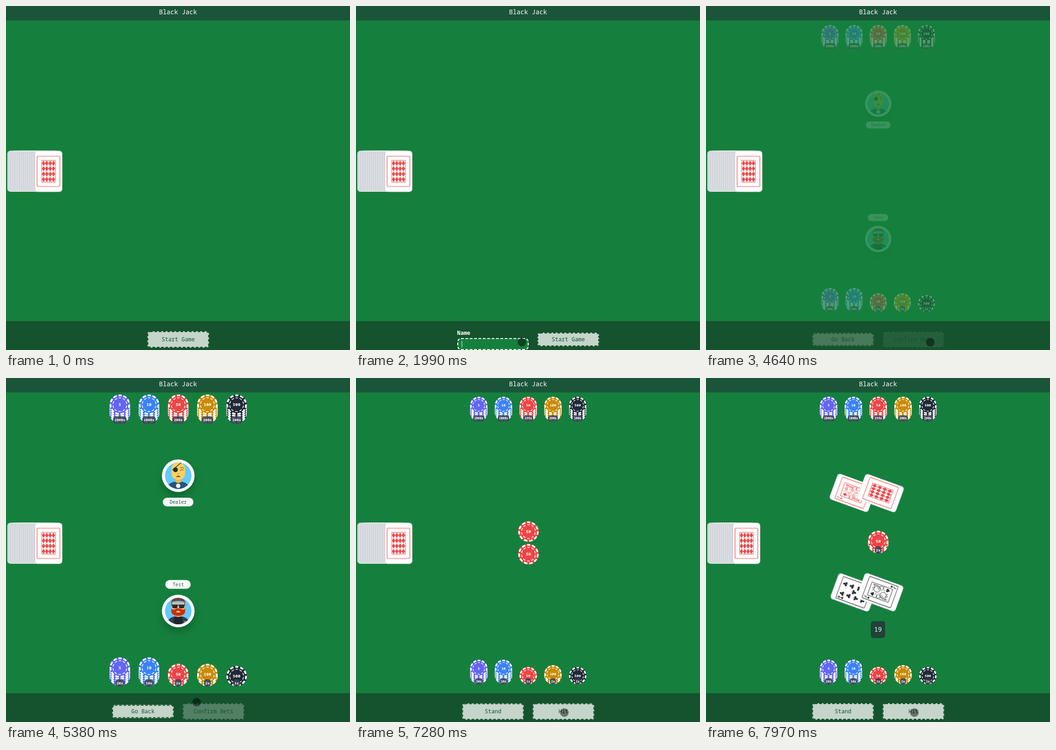
Recreate the animation shown at these times as an HTML page. Size 747 by 750 pixels, loop 8 s.

```html
<!DOCTYPE html>
<html lang="en">
<head>
<meta charset="utf-8">
<title>Black Jack</title>
<style>
  html, body { margin: 0; width: 100%; height: 100%; overflow: hidden; background: #15803d; }
  svg { display: block; width: 747px; height: 750px; }
  text { font-family: "Noto Sans Mono", "DejaVu Sans Mono", monospace; white-space: pre; }
  .suit { font-family: "DejaVu Sans", sans-serif; }
  .avatar { filter: drop-shadow(0 10px 9px rgba(0, 0, 0, .22)); }
</style>
</head>
<body>
<svg id="stage" viewBox="0 0 747 750">
  <defs>
    <clipPath id="round"><circle r="29"/></clipPath>
  </defs>
  <rect width="747" height="750" fill="#15803d"/>
  <rect width="747" height="31.5" fill="#1b5539"/>
  <rect y="687" width="747" height="63" fill="#14532d"/>

  <g id="chips"></g>
  <g id="dealerCards"></g>
  <g id="deck"></g>
  <g id="bets"></g>

  <g id="dealer">
    <g class="avatar"><circle r="35.5" fill="#fff"/></g>
    <g clip-path="url(#round)">
      <circle r="29" fill="#65c9ff"/>
      <path d="M-6 4h12v14h-12z" fill="#e9bb4a"/>
      <path d="M-24 32c0-14 7-17 17-19q7 6 14 0c10 2 17 5 17 19z" fill="#25557c"/>
      <path d="M-15-14c0-20 30-20 30 0v8c0 20-30 20-30 0z" fill="#f8d25c"/>
      <path d="M-13-12 7-29" stroke="#262e33" stroke-width="1.4"/>
      <circle cx="-6" cy="-13" r="5.2" fill="#262e33"/>
      <path d="M4-17q4-2 8 1M4-11q3-3 7-1" fill="none" stroke="#6b5526" stroke-width="1.3"/>
      <path d="M-2-5q2 2 4 0" fill="none" stroke="#c79a37" stroke-width="1.4"/>
      <path d="M-5 3q5-6 10 0z" fill="#6d1f2a"/>
      <path d="M-3.5 2.6q3.5-2 7 0z" fill="#ff4f6d"/>
      <circle cy="22" r="4.8" fill="#f3f6f8"/>
    </g>
    <rect x="-33.5" y="48" width="66.5" height="19" rx="9.5" fill="#f5f6f7"/>
  </g>

  <g id="player">
    <g class="avatar"><circle r="35.5" fill="#fff"/></g>
    <g clip-path="url(#round)">
      <circle r="29" fill="#65c9ff"/>
      <path d="M-24 32c0-14 6-17 15-20h18c9 3 15 6 15 20z" fill="#2f3c4a"/>
      <path d="M-8 12h16l2 20h-20z" fill="#1d252d"/>
      <path d="M-14-18h28v16c0 20-28 20-28 0z" fill="#e9b58d"/>
      <path d="M-15-8v-11c0-13 30-13 30 0v11l-2-12q-13-4-26 0z" fill="#724133"/>
      <path d="M-15-6c2 4 6 3 8 2q7-4 14 0c2 1 6 2 8-2v7c0 13-30 13-30 0z" fill="#c93305"/>
      <path d="M-5 2q5-5 10 0l-2 1h-6z" fill="#f0d8c4"/>
      <path d="M-15-13h30" stroke="#20262b" stroke-width="1.6"/>
      <rect x="-13" y="-14" width="11.5" height="8" rx="3.5" fill="#20262b"/>
      <rect x="1.500" y="-14" width="11.5" height="8" rx="3.5" fill="#20262b"/>
      <path d="M-11-9l5-4M4-9l5-4" stroke="#59656d"/>
      <path d="M12 24l5-2" stroke="#dfe5e8" stroke-width="1.3"/>
    </g>
    <rect x="-28" y="-67.5" width="55" height="19" rx="9.5" fill="#fff"/>
  </g>

  <g id="playerCards"></g>
  <g id="score"><rect x="358" y="530" width="31" height="37" rx="6" fill="#1f4239"/></g>
  <g id="form">
    <rect x="221" y="725" width="153" height="24" rx="7" fill="#15803d" stroke="#fff"
          stroke-width="2" stroke-dasharray="6 3.5"/>
    <rect id="caret" x="229.500" y="730" width="1" height="14" fill="#fff"/>
  </g>
  <g id="buttons"></g>
  <circle id="cursor" r="9.3" fill="#000" fill-opacity=".47"/>
</svg>

<script>
const LOOP = 8000;
const RED = '#ef4444', INK = '#26292c', LEAF = '#14532d';
const $ = id => document.getElementById(id);

function add(parent, tag, attrs = {}, text) {
  const node = document.createElementNS('http://www.w3.org/2000/svg', tag);
  for (const key in attrs) node.setAttribute(key, attrs[key]);
  if (text !== undefined) node.textContent = text;
  return parent.appendChild(node);
}

// Text placed by the middle of its capitals
function label(parent, x, y, size, fill, text, extra = {}) {
  return add(parent, 'text', {
    x, y: y + size * .35, 'font-size': size, fill, 'text-anchor': 'middle', ...extra
  }, text);
}

// frames: [ms, properties, easing]; the first and last are held to the loop's ends
function play(node, frames) {
  const all = frames.filter(f => f[0] <= LOOP);
  if (all[0][0] > 0) all.unshift([0, all[0][1]]);
  const last = all[all.length - 1];
  if (last[0] < LOOP) all.push([LOOP, last[1]]);
  node.animate(all.map(([ms, props, easing = 'ease-in-out']) =>
    ({ offset: ms / LOOP, easing, ...props })), { duration: LOOP, iterations: Infinity });
}

const pose = (x, y, s = 1, r = 0) =>
  ({ transform: `translate(${x}px, ${y}px) rotate(${r}deg) scale(${s})` });
const move = (node, steps) =>
  play(node, steps.map(([ms, x, y, s, r, easing]) => [ms, pose(x, y, s, r), easing]));
const fade = (node, steps) =>
  play(node, steps.map(([ms, opacity]) => [ms, { opacity }, 'linear']));
const show = (node, from, to = LOOP + 1, len = 0) =>
  fade(node, [[from, 0], [from + len, 1], [to, 1], [to + len, 0]]);
const hide = (node, at, len = 0) => fade(node, [[at, 1], [at + len, 0]]);

// Chips
const KINDS = [['5', '#6366f1'], ['10', '#3b82f6'], ['50', RED], ['100', '#ca8a04'], ['500', '#1f2937']];
const STEP = 4.65;

function ring(g, r, width, dash, count) {
  const gap = 2 * Math.PI * r / count - dash;
  add(g, 'circle', {
    r, fill: 'none', stroke: '#fff', 'stroke-width': width,
    'stroke-dasharray': `${dash} ${gap}`, 'stroke-dashoffset': dash / 2, transform: 'rotate(-90)'
  });
}

function chip(parent, x, y, [value, color]) {
  const g = add(parent, 'g', { transform: `translate(${x} ${y})` });
  add(g, 'circle', { r: 22.3, fill: color });
  ring(g, 20.4, 3.75, 7.5, 11);
  ring(g, 15, 1.6, 5.6, 10);
  label(g, 0, 0, 9.2, '#fff', value, { 'font-weight': 700 });
  return g;
}

function badge(parent, x, y, text) {
  const g = add(parent, 'g');
  const w = text.length * 4.7 + 6;
  add(g, 'rect', { x: x - w / 2, y: y - 8, width: w, height: 16, rx: 6.5, fill: '#374151', 'fill-opacity': .88 });
  label(g, x, y, 7.8, '#fff', text, { 'font-weight': 700 });
  return g;
}

function row(middle, base, counts) {
  const g = add($('chips'), 'g');
  const stacks = KINDS.map((kind, i) => {
    const x = (i - 2) * 63.4, y = base - middle;
    const n = Math.min(counts[i], 5);
    const layers = [];
    for (let k = 0; k < n; k++) layers.push(chip(g, x, y - k * STEP, kind));
    return { x, y: y + 14.8, top: layers[n - 1], tag: badge(g, x, y + 14.8, counts[i] + 'x') };
  });
  move(g, [[4560, 374, middle, .8], [4880, 374, middle, 1], [6880, 374, middle, 1], [7300, 374, middle, .846], [7970, 374, middle, .85]]);
  show(g, 4560, LOOP + 1, 280);
  return { g, fifty: stacks[2] };
}

const BET = 6050;
const house = row(68, 76.8, [2000, 1000, 200, 200, 100]);
const mine = row(642, 650, [20, 10, 2, 2, 1]);
hide(mine.fifty.top, BET);
for (const [{ g, fifty }, text] of [[house, '199x'], [mine, '1x']]) {
  hide(fifty.tag, BET);
  show(badge(g, fifty.x, fifty.y, text), BET);
}

// Bets
function bet(from, mid, rest, late, end) {
  const g = add($('bets'), 'g');
  chip(g, 0, 0, KINDS[2]);
  move(g, [[BET, 374, from, .75], [6330, 374, mid, .87, 0, 'ease-out'], [6620, 374, rest],
    [6880, 374, rest], [7300, 374.5, late], [7640, 374.5, late], [7900, 374, end]]);
  show(g, BET, LOOP + 1, 120);
}
bet(505, 475, 419, 384, 360);
bet(213, 243, 300, 335, 355.3);
show(badge($('bets'), 374, 375, '2x'), 7820, LOOP + 1, 100);

// Cards, drawn around their middle: a plate, then a panel with the picture
const plate = g => add(g, 'rect', {
  x: -29.5, y: -44.5, width: 59, height: 89, rx: 6, fill: '#fff', stroke: '#c9ced3', 'stroke-width': .7
});

function panel(parent, color) {
  const g = add(parent, 'g');
  add(g, 'rect', { x: -27, y: -34.5, width: 54, height: 69, rx: 2, fill: '#fff' });
  add(g, 'rect', { x: -25, y: -33, width: 49.5, height: 66, rx: 1.5, fill: 'none', stroke: color, 'stroke-width': 1.2 });
  return g;
}

function back(parent) {
  const g = panel(parent, RED);
  add(g, 'rect', { x: -15, y: -24, width: 29.5, height: 47.5, fill: 'none', stroke: RED });
  let d = '';
  for (let i = 0; i < 16; i++)
    d += `M${-10.9 + i % 4 * 7.1} ${-23.4 + (i >> 2) * 11.7}l3.6 5.800l-3.6 5.800l-3.6-5.800z`;
  add(g, 'path', { d, fill: RED });
  return g;
}

function face(parent, rank, suit, color) {
  const g = panel(parent, color);
  for (const turn of [0, 180]) {
    const half = add(g, 'g', { transform: `rotate(${turn})` });
    const pip = (x, y, size) => label(half, x, y, size, color, suit, { class: 'suit' });
    label(half, -20, -27, 9, color, rank, { 'font-weight': 700 });
    pip(-20, -19.5, 8);
    if (rank === 'J') {
      pip(-9, -15, 13);
      add(half, 'path', {
        d: 'M-2-18l3 3 3-4 3 4 4-3v5M-5-9q-4 5-9 6M10-8l4 9M-3-2l-8 6M-14-5l8 2M12-20v12M6-8h3M4-5h4',
        fill: 'none', stroke: color, 'stroke-width': .9
      });
      add(half, 'circle', { cx: 4, cy: -8.500, r: 6.5, fill: 'none', stroke: color });
    } else {
      for (const x of [-11, 11]) for (const y of [-22.5, -8]) pip(x, y, 14);
      if (!turn) pip(0, 0, 14);
    }
  }
  if (rank === 'J') add(g, 'rect', { x: -15, y: -24, width: 30, height: 48, fill: 'none', stroke: color });
  return g;
}

const DEAL = 7480;
function deal(parent, draw, midX, midY, x, y, seen) {
  const g = add(parent, 'g');
  const base = plate(g);
  const body = add(g, 'g');
  const sides = draw(body);
  move(g, [[DEAL, 92.5, 360.5, 1, 0, 'ease-in'], [7620, midX, midY, 1.25, 14.5, 'cubic-bezier(.3,.35,.5,1)'], [7960, x, y, 1, 110]]);
  fade(base, [[DEAL, 0], [7620, .45], [7740, 1]]);
  fade(body, [[DEAL, 0], [7620, seen], [7720, 1]]);
  return sides;
}

const hidden = deal($('dealerCards'), b => [back(b), face(b, 'J', '♦', RED)], 113, 323, 319, 250.5, 1);
fade(hidden[1], [[7720, 0], [7960, .85]]);
deal($('dealerCards'), back, 128, 323, 379, 251, 1);
deal($('playerCards'), b => face(b, '9', '♣', INK), 137, 378, 321, 467.5, .6);
deal($('playerCards'), b => face(b, 'J', '♠', INK), 119, 376, 378, 467, .62);

// Deck
for (let i = 0; i < 13; i++)
  add($('deck'), 'rect', { x: 3.3 + i * 4.62, y: 316, width: 59, height: 88.5, rx: 6, fill: '#d1d5db', stroke: '#eef0f2', 'stroke-width': .8 });
hide($('deck').children[12], 7760);
const topCard = add($('deck'), 'g');
plate(topCard);
back(topCard);
move(topCard, [[7500, 92.5, 360.5], [7900, 88, 360.5]]);

// Players
label($('dealer'), 0, 57.5, 10.3, '#1f5a55', 'Dealer');
label($('player'), 0, -58, 10.3, '#166534', 'Test');
for (const [id, y, shift] of [['dealer', 213, -42], ['player', 508, 42]]) {
  move($(id), [[4600, 374, y, .8], [4900, 374, y, 1], [6020, 374, y, 1], [6300, 374, y + shift, 1],
    [6850, 374, y + shift, 1], [7100, 374, y + shift, .8]]);
  show($(id), 4600, 6850, 260);
}
label($('score'), 373.5, 548.5, 13.75, '#fff', '19', { 'font-weight': 500 });
show($('score'), 7380, LOOP + 1, 160);

label($('stage'), 373.5, 13.5, 13.75, '#fff', 'Black Jack', { 'font-weight': 500 });

// Buttons: the dashes match the bar, so the edge looks notched
function button(text, h) {
  const g = add($('buttons'), 'g');
  const box = add(g, 'g');
  add(box, 'rect', { x: -67, y: -h / 2, width: 134, height: h, rx: 6, fill: '#c5d5ca' });
  add(box, 'rect', {
    x: -66, y: 1 - h / 2, width: 132, height: h - 2, rx: 5, fill: 'none',
    stroke: LEAF, 'stroke-width': 2, 'stroke-dasharray': '5.6 3.8'
  });
  label(g, 0, 0, 12, LEAF, text, { 'font-weight': 500 });
  return { g, box };
}

const start = button('Start Game', 36);
move(start.g, [[860, 374, 727], [940, 374, 727, .97], [1030, 374, 727], [1380, 374, 727], [1680, 461, 727]]);
play(start.box, [[1380, { transform: 'scale(1, 1)' }], [1600, { transform: 'scale(1, .81)' }]]);
hide(start.g, 4420, 150);

const goBack = button('Go Back', 29), confirm = button('Confirm Bets', 36);
move(goBack.g, [[0, 297.5, 727]]);
show(goBack.g, 4600, 6840, 140);
move(confirm.g, [[0, 450.5, 727]]);
fade(confirm.g, [[4600, 0], [4740, .35], [BET, .35], [6200, 1], [6840, 1], [6980, 0]]);

for (const [text, x] of [['Stand', 297.5], ['Hit', 450.5]]) {
  const { g } = button(text, 36);
  move(g, [[7000, x, 750], [7300, x, 727], [7560, x, 724], [7640, x, 724], [7860, x, 727]]);
  show(g, 7000, LOOP + 1, 200);
}

// Name field
const CHAR = 6.19;
label($('form'), 219.5, 712.5, 12, '#fff', 'Name', { 'text-anchor': 'start', 'font-weight': 700 });
const typed = label($('form'), 228.5, 737, 10.3, '#fff', '', { 'text-anchor': 'start' });
const keys = [3120, 3260, 3430, 3560];
[...'Test'].forEach((letter, i) =>
  play(add(typed, 'tspan', {}, letter), [[keys[i], { fillOpacity: 0 }], [keys[i], { fillOpacity: 1 }]]));
play($('caret'), keys.flatMap((ms, i) => [[ms, pose(i * CHAR, 0)], [ms, pose((i + 1) * CHAR, 0)]]));
fade($('caret'), [[1930, 0], [1930, 1], [2460, 1], [2460, 0], [2990, 0], [2990, 1], [3760, 1], [3760, 0]]);
show($('form'), 1380, 4420, 200);

// Pointer
move($('cursor'), [[570, 484, 761], [860, 412, 731], [1030, 400, 728], [1560, 400, 728], [1900, 360, 733],
  [3560, 360, 733], [3770, 398, 741], [3900, 398, 741], [4220, 487, 733], [5180, 487, 733, 1, 0, 'linear'],
  [5380, 414, 707, 1, 0, 'linear'], [5680, 388, 644], [5920, 388, 650], [6150, 388, 655], [6330, 391.5, 665.5],
  [6640, 452.5, 729.5]]);
</script>
</body>
</html>
```
